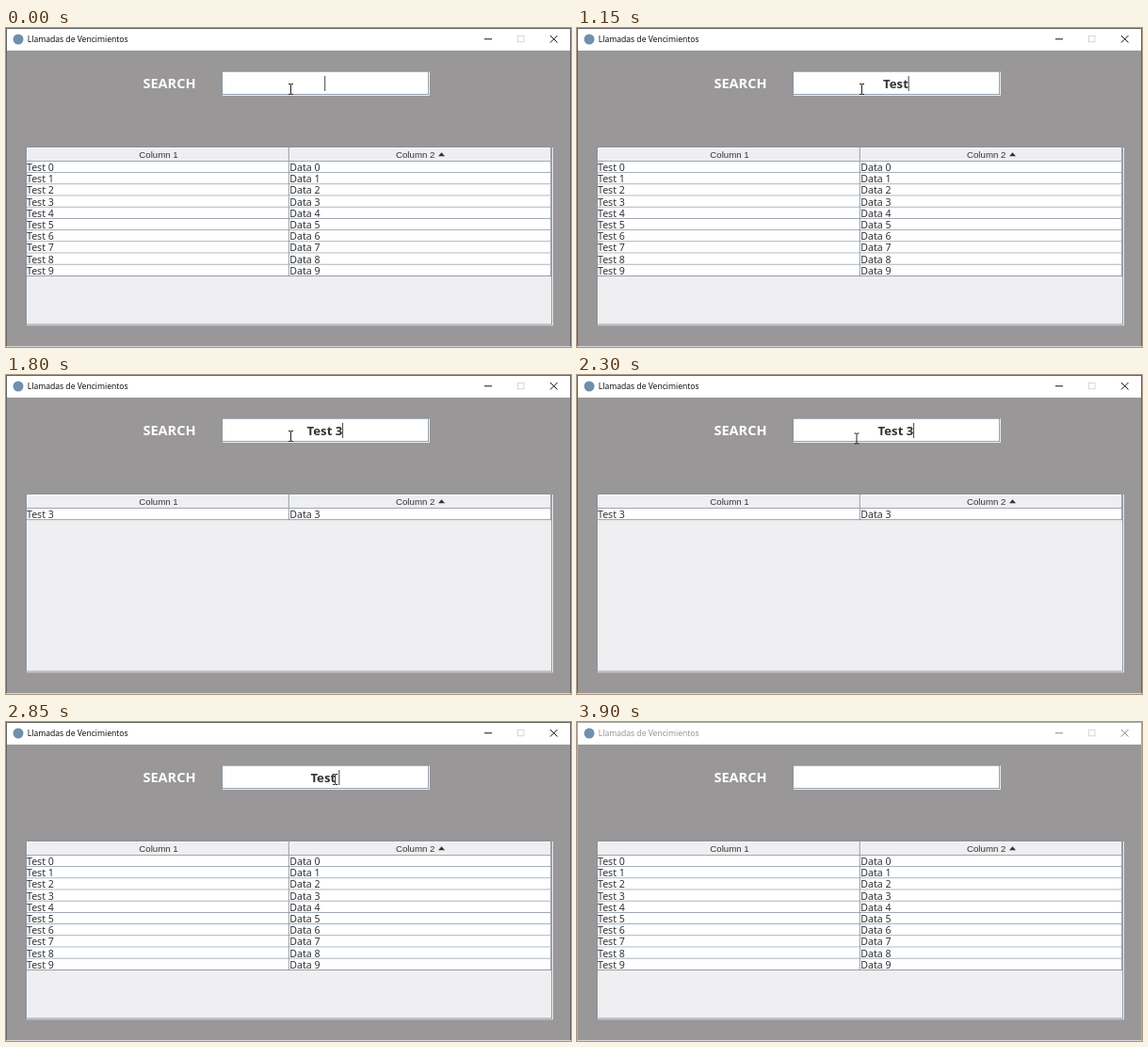
These frames come from a looping animation (600 by 339 pixels, 3950 ms). An HTML page:

```html
<!DOCTYPE html>
<html lang="es">
<head>
<meta charset="utf-8">
<title>Llamadas de Vencimientos</title>
<style>
  html, body { margin: 0; width: 100%; height: 100%; overflow: hidden; background: #fff; }
  svg { display: block; width: 600px; height: 339px; }
  text { white-space: pre; }
  .crisp { shape-rendering: crispEdges; }
  .title { font: 8.6px "Open Sans", sans-serif; fill: #000; }
  .label { font: bold 14.5px "Noto Sans", sans-serif; fill: #fff; }
  .typed { font: bold 13.2px "Noto Sans", sans-serif; fill: #333; }
  .head { font: 9.7px "Liberation Sans", Arial, sans-serif; fill: #333; text-anchor: middle; }
  .cell { font: 10.6px "Noto Sans", sans-serif; fill: #333; }
  .dark, .light { fill: none; stroke-width: .8; }
  .dark { stroke: #7a8a99; }
  .light { stroke: #fff; }
  .edge { fill: #666; }
  .button { fill: none; stroke: #111; }
  .inactive .title { fill: #8f8f8f; }
  .inactive .edge { fill: #aaa; }
  .inactive .button { stroke: #888; }
</style>
</head>
<body>
<svg id="stage" viewBox="0 0 600 339" xmlns="http://www.w3.org/2000/svg">
  <rect width="600" height="339" fill="#fff"/>
  <rect y="24" width="600" height="314" fill="#999798"/>
  <g class="crisp">
    <rect class="edge" width="600" height="1"/>
    <rect class="edge" width="1" height="338"/>
    <rect class="edge" x="599" width="1" height="338"/>
    <rect y="338" width="600" height="1" fill="#d8d8d8"/>
  </g>

  <circle cx="13" cy="12" r="5.5" fill="#6f8fac"/>
  <text class="title" x="22.8" y="15.3">Llamadas de Vencimientos</text>
  <path class="button" d="M508 11.8h8"/>
  <rect x="543.5" y="8.3" width="6.5" height="6.5" fill="none" stroke="#ccc" stroke-width=".8"/>
  <path class="button" d="M578 8l7.5 7.5m0-7.5l-7.5 7.5"/>

  <text class="label" x="145.5" y="63.6">SEARCH</text>
  <rect x="229.6" y="46.2" width="219.6" height="25" fill="#fff"/>
  <rect class="light" x="230.4" y="47" width="219" height="24.4"/>
  <rect class="dark" x="229.6" y="46.2" width="219" height="24.4"/>
  <text class="typed" id="typed" y="63.6" xml:space="preserve"></text>
  <rect id="caret" y="51" width=".9" height="16" fill="#333"/>

  <rect x="21.6" y="126.6" width="558.4" height="188.8" fill="#efeef0"/>
  <rect class="light" x="22.4" y="127.4" width="558" height="188.4"/>
  <path class="light" d="M301.2 127v14"/>
  <rect class="dark" x="21.6" y="126.6" width="558" height="188.4"/>
  <path class="dark" d="M22 141.5h557M300.4 127v14M578.6 127v14"/>
  <text class="head" x="162" y="138">Column 1</text>
  <text class="head" x="434.7" y="138">Column 2</text>
  <path d="M459 136.3l3.5-4 3.5 4z" fill="#333"/>
  <g id="rows"></g>

  <g id="pointer">
    <path id="beam" d="M-2.5-5.5h2l.5.5.5-.5h2M0-5v10M-2.5 5.5h2l.5-.5.5.5h2" fill="none" stroke="#222"/>
    <path id="arrow" d="M.5.5v12.2l2.8-2.7 1.9 4.4 1.9-.8-1.9-4.2h3.9z" fill="#fff" stroke="#111" stroke-width=".8"/>
  </g>
</svg>
<script>
const LOOP = 3950, TICK = 50, FIELD_X = 338.49, ROWS_Y = 141.5, ROW_H = 12.2;
const $ = id => document.getElementById(id);

// time, text, caret shown
const typing = [
  [0, '', 1], [200, '', 0],
  [400, 'T', 1], [650, 'T', 0], [900, 'T', 1],
  [950, 'Te', 1], [1050, 'Tes', 1], [1150, 'Test', 1], [1350, 'Test', 0],
  [1500, 'Test ', 1], [1750, 'Test 3', 1], [1950, 'Test 3', 0],
  [2250, 'Test 3', 1], [2450, 'Test 3', 0], [2700, 'Test 3', 1],
  [2800, 'Test ', 1], [2950, 'Test', 1], [3000, 'Tes', 1],
  [3050, 'Te', 1], [3100, 'T', 1], [3150, '', 1],
  [3350, '', 0], [3550, '', 1], [3750, '', 0]
];

// time, x, y
const path = [
  [0, 302.5, 65], [2200, 302.5, 65], [2300, 297, 67.5], [2400, 297, 67.5],
  [2550, 318, 66], [2750, 349.7, 61], [2850, 349.7, 61], [2950, 348, 66],
  [3050, 345, 61], [3150, 335, 45], [3300, 225, 30], [3500, 76, 5]
];

function buildRow(i) {
  return `<g transform="translate(0 ${ROWS_Y + ROW_H * i})">
    <rect x="22" y=".4" width="557" height="${ROW_H - .4}" fill="#fff"/>
    <path class="dark" d="M22 ${ROW_H}h557M300.4 .4v${ROW_H}M578.6 .4v${ROW_H}"/>
    <text class="cell" x="22" y="10.5">Test ${i}</text>
    <text class="cell" x="301.3" y="10.5">Data ${i}</text></g>`;
}
$('rows').innerHTML = Array.from({ length: 10 }, (_, i) => buildRow(i)).join('');
const rows = [...$('rows').children];

const show = (el, on) => el.setAttribute('visibility', on ? 'visible' : 'hidden');

function pointerAt(t) {
  const next = path.findIndex(p => p[0] > t);
  if (next < 0) return path[path.length - 1].slice(1);
  const [t0, x0, y0] = path[next - 1], [t1, x1, y1] = path[next];
  const k = (t - t0) / (t1 - t0);
  return [x0 + (x1 - x0) * k, y0 + (y1 - y0) * k];
}

function drawField(t) {
  const [, text, caretOn] = typing.filter(s => s[0] <= t).pop();
  const typed = $('typed');
  typed.textContent = text;
  const half = text ? typed.getComputedTextLength() / 2 : 0;
  typed.setAttribute('x', FIELD_X - half);
  $('caret').setAttribute('x', FIELD_X + half - .2);
  show($('caret'), caretOn);
}

function drawRows(t) {
  const filtered = t >= 1800 && t < 2850;
  rows.forEach((row, i) => show(row, !filtered || i === 3));
  $('rows').setAttribute('transform', `translate(0 ${filtered ? -3 * ROW_H : 0})`);
}

function drawPointer(t) {
  const [x, y] = pointerAt(t), inField = y > 45, visible = t < 3550;
  $('pointer').setAttribute('transform', `translate(${x} ${y})`);
  show($('beam'), visible && inField);
  show($('arrow'), visible && !inField);
}

let last = -1;
function frame(now) {
  const t = Math.floor(now % LOOP / TICK) * TICK;
  if (t !== last) {
    last = t;
    $('stage').classList.toggle('inactive', t >= 3900);
    drawField(t);
    drawRows(t);
    drawPointer(t);
  }
  requestAnimationFrame(frame);
}
frame(performance.now());
</script>
</body>
</html>
```
